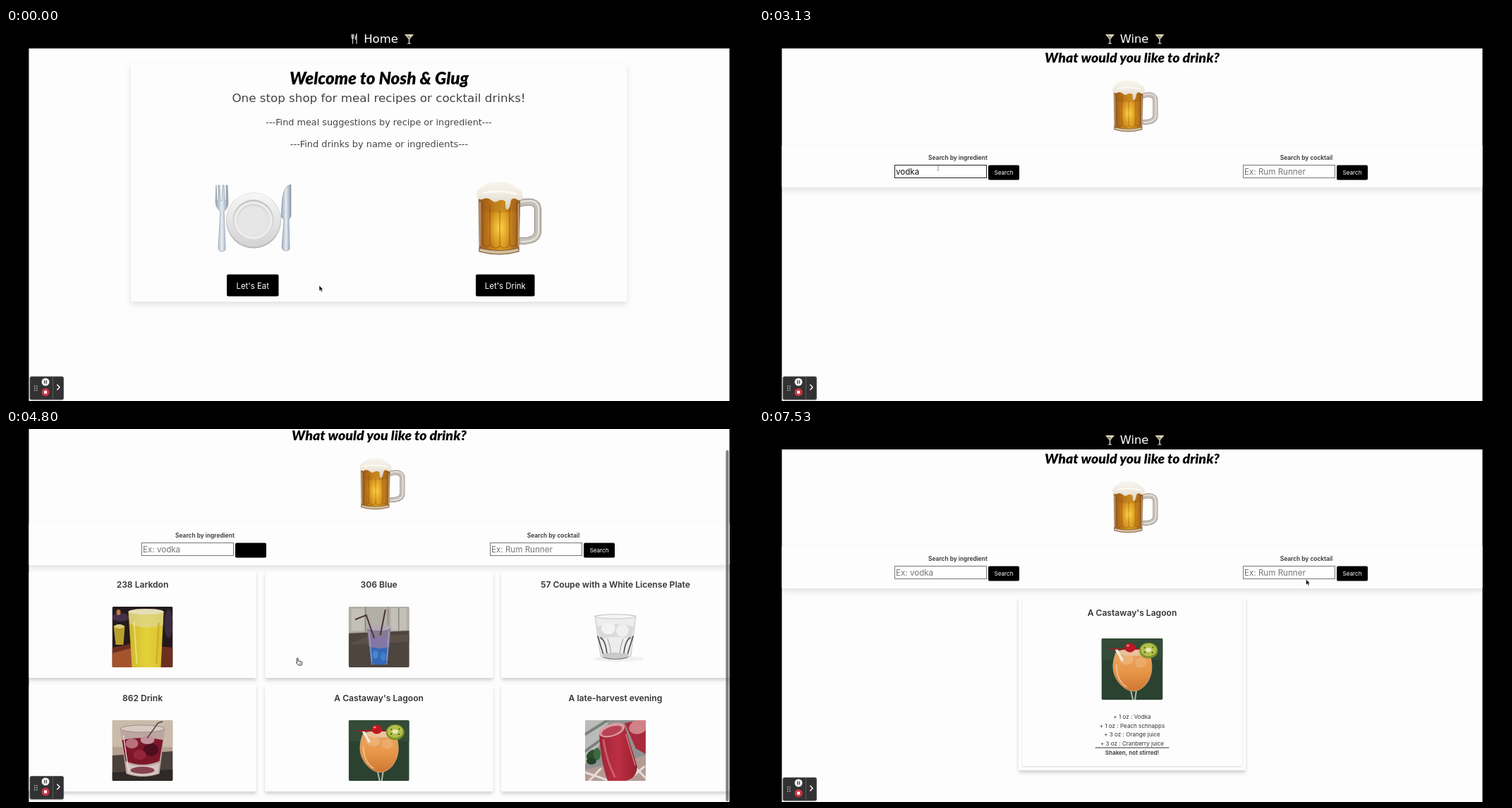
Write an HTML page that moves like this. It is 1059 px wide and 529 px high and loops after 7600 ms.

```html
<!DOCTYPE html>
<html lang="en">
<head>
<meta charset="utf-8">
<title>Recipes and drinks</title>
<style>
html, body { margin: 0; width: 100%; height: 100%; overflow: hidden; background: #000; }
svg { display: block; width: 100%; height: 100%; }
text { font-family: Inter, "Noto Sans", sans-serif; fill: #333; }
.mid { text-anchor: middle; }
.wide { font-family: "DejaVu Sans", sans-serif; fill: #444; }
.nav { font-family: "DejaVu Sans", sans-serif; fill: #fff; }
.script { font-family: Lato, sans-serif; font-weight: 900; font-style: italic; fill: #000; }
.bold { font-weight: 600; }
.light { fill: #fff; }
.hint { fill: #757575; }
</style>
</head>
<body>
<svg id="stage" viewBox="0 0 1059 529" preserveAspectRatio="none"></svg>
<script>
const LOOP = 7600, PAPER = '#fdfdfd';
const stage = document.getElementById('stage');

const rect = (x, y, w, h, fill, extra = '') =>
  `<rect x="${x}" y="${y}" width="${w}" height="${h}" fill="${fill}" ${extra}/>`;
const path = (d, fill = 'none', extra = '') => `<path d="${d}" fill="${fill}" ${extra}/>`;
const line = (d, color, width = 1, extra = '') =>
  path(d, 'none', `stroke="${color}" stroke-width="${width}" stroke-linecap="round" ${extra}`);
const oval = (x, y, rx, ry, fill, extra = '') =>
  `<ellipse cx="${x}" cy="${y}" rx="${rx}" ry="${ry}" fill="${fill}" ${extra}/>`;
const text = (x, y, size, str, cls = 'mid', id = '') =>
  `<text x="${x}" y="${y + size * .36}" font-size="${size}" class="${cls}" ${id && `id="${id}"`}>${str}</text>`;
const group = (id, body, extra = '') => `<g id="${id}" ${extra}>${body}</g>`;
const use = (id, x, y, scale = 1) => `<use href="#${id}" transform="translate(${x} ${y}) scale(${scale})"/>`;
const panel = (x, y, w, h, filter = 'shade') => rect(x, y, w, h, PAPER, `rx="2" filter="url(#${filter})"`);
const gradient = (id, stops, vertical) =>
  `<linearGradient id="${id}" ${vertical ? 'x2="0" y2="1"' : ''}>${stops.map((c, i) =>
    `<stop offset="${i / (stops.length - 1)}" stop-color="${c}"/>`).join('')}</linearGradient>`;
const shadow = (id, dy, blur, alpha) =>
  `<filter id="${id}" x="-10%" y="-20%" width="120%" height="150%"><feDropShadow dx="0" dy="${dy}" stdDeviation="${blur}" flood-opacity="${alpha}"/></filter>`;

const mug =
  line('M60 32Q86 25 87 40V72Q86 86 60 85', '#857f78', 10) +
  line('M60 32Q86 25 87 40V72Q86 86 60 85', '#c6c0b8', 8.4) +
  line('M62 30Q87 23 88 40V72Q87 86 64 86', '#e8e4de', 2) +
  path('M3 19H62L60 100Q32 108 4 100Z', 'url(#beer)', 'stroke="#8d7358" stroke-width=".7"') +
  path('M4 20H61V42Q32 48 4 42Z', '#8a4d12', 'opacity=".25"') +
  oval(33, 67, 18, 29, 'url(#glow)') +
  path('M4 95Q32 102 60 95V100Q32 108 4 100Z', '#d5bd9a', 'stroke="#5c432c" stroke-width=".8"') +
  line('M9 30V90Q15 97 19 90V34M19 90Q26 99 33 92V42M33 92Q40 99 47 90V38M47 90Q53 96 57 89V30', '#7d430d', 1.2, 'opacity=".55"') +
  line('M5 30V92M59.5 32V92', '#e2c79a', 1.4, 'opacity=".7"') +
  path('M0 20Q1 11 9 8Q16 0 30 1Q47 0 54 8Q66 12 66 24Q62 30 57 26Q52 23 49 27Q48 33 46 39Q42 43 41 36V29Q36 25 31 28Q26 32 21 27Q15 23 11 25Q5 28 2 24Z', 'url(#foam)') +
  line('M11 17Q30 12 56 18', '#fffdf8', 3, 'opacity=".8"');

const martini =
  path('M0 1H13L7.2 8V13L10 14.5H3L5.8 13V8Z', '#d9d5c8') +
  path('M2.8 3H10.2L6.5 7Z', '#8c8a55') + oval(8, 3.4, 1.3, 1.1, '#e9d9a0');

const cutlery =
  line('M2 1V5Q2 7 3.5 7T5 5V1M3.5 1V14', '#d8d8d8', 1.1) + line('M9 14V1Q7 4 7.5 8H9', '#d8d8d8', 1.2);

const plate =
  `<g stroke="#8c98a5" stroke-width=".7">` +
  path('M298 223L297 247Q298 256 304 260L301 311Q301 317 306 317Q312 317 311 311L309 260Q315 256 315 247L314 223H312L312 245H310L309 223H307L306 245H304L303 223H301L301 245H299Z', 'url(#steel)') +
  path('M404 222Q392 224 391 252L390 268L394 272L391 311Q392 316 397 316Q403 316 402 311L401 272L404 267Z', 'url(#steel)') + '</g>' +
  oval(351, 273, 39, 39.5, '#b9b9ba') + oval(351, 272, 38.3, 38.3, 'url(#china)') +
  oval(350.5, 272, 28.5, 28.5, '#c4c4c5') + oval(350.5, 273, 27.5, 27, '#ececed') +
  oval(350.5, 272.5, 23, 23, '#d6d6d7') + oval(350.5, 273.5, 22, 21.5, '#e6e6e7');

// Drink pictures, each 86 by 86
const photos = [
  rect(0, 0, 86, 86, '#241a1d') + oval(12, 15, 12, 6, '#44304a') + oval(80, 24, 6, 20, '#3b2c40') +
    oval(9, 8, 3, 4, '#bd7940') + path('M0 58L30 52L86 58V86H0Z', '#6d2f1e') + path('M0 66L30 58V86H0Z', '#a4542b') +
    path('M2 27H18L16 54H5Z', '#b89f2c') + oval(10, 28, 7, 3, '#dccb7a') +
    path('M23 7Q47 1 73 7L69 86H28Z', 'url(#lemon)') + path('M23 7Q47 1 73 7L72 26Q46 34 25 24Z', '#ded79a', 'opacity=".65"') +
    oval(48, 7, 25, 4, '#e4dfb8') + line('M31 22L35 80', '#f2ea94', 2, 'opacity=".7"') + line('M66 24L63 80', '#c39d1c', 3, 'opacity=".5"'),
  rect(0, 0, 86, 86, '#a29d96') + rect(0, 0, 86, 36, '#b3afa7') + rect(4, 3, 18, 31, '#c3c0b8') + rect(60, 2, 22, 31, '#c3c0b8') +
    line('M24 0V36M56 0V36M71 2V33', '#8b8780', 1.5) + path('M0 38L86 34V86H0Z', '#4d453e') + path('M0 54L30 40H86V50Z', '#5a5048') +
    path('M26 29H60L55 82H32Z', '#857b92') + path('M29 53H57L55 80Q44 85 32 80Z', '#3468b4') + path('M28 44H58L57 57Q42 62 29 56Z', '#8477a6') +
    oval(43, 30, 17, 4, '#b0a8b4') + oval(38, 68, 4, 6, '#5c97da', 'opacity=".6"') + oval(49, 71, 4, 6, '#4b86d2', 'opacity=".7"') +
    line('M36 44L25 12L10 18M45 40L52 5', '#4c3336', 2) + line('M29 35L33 78M57 35L54 78', '#b3afc8', 1),
  rect(0, 0, 86, 86, PAPER) + oval(48, 74, 36, 4, '#f0f0f0') +
    path('M14 13Q43 9 72 13L65 70Q43 78 22 70Z', '#ededed', 'stroke="#b0b0b0" stroke-width=".7"') +
    oval(43, 14, 28, 3, '#f6f6f6', 'stroke="#b5b5b5" stroke-width=".7"') +
    path('M17 28Q43 22 69 28L66 46Q43 40 20 46Z', '#dadada') + oval(33, 31, 10, 8, '#f3f3f3') + oval(53, 34, 9, 9, '#f0f0f0') +
    line('M18 42L26 68M68 42L60 68M22 44Q29 48 31 66M64 44Q57 48 55 66', '#4c4c4c', 1.6) +
    line('M32 46Q36 56 37 68M54 46Q50 56 49 68', '#a5a5a5', 1.2) +
    path('M24 67Q43 63 62 67V72Q43 78 25 72Z', '#cacaca') + line('M26 72Q43 77 60 72', '#777', 1.2),
  rect(0, 0, 86, 86, '#b5a190') + rect(0, 0, 86, 38, '#c9baaa') + path('M0 50L86 44V86H0Z', '#4a403c') + path('M0 74L86 70V86H0Z', '#2f2928') +
    path('M11 12H75L67 76Q43 84 20 76Z', '#bda6a0') + path('M14 28Q43 22 72 28L67 58Q43 68 19 58Z', '#7c1729') +
    oval(28, 33, 9, 7, '#b8717c') + oval(55, 42, 11, 9, '#4f0e1e') + oval(39, 49, 9, 7, '#96253a') + oval(50, 28, 10, 6, '#c4929a') +
    oval(43, 12, 31, 5, '#d8cac1', 'stroke="#90827c" stroke-width=".8"') + path('M20 61Q43 69 67 61L65 75Q43 83 22 75Z', '#d3c4c0') +
    oval(43, 71, 17, 5, '#84434d') + line('M50 25L65 4L71 2', '#504747', 1.5) + line('M16 22L23 70', '#eee2dd', 1.3),
  rect(0, 0, 86, 86, '#2b4230') + rect(0, 0, 86, 30, '#334b37') + line('M41 72L44 86M49 72L47 86', '#aeb7a8', 2) +
    path('M21 18Q43 13 66 18Q77 46 62 65Q45 83 27 65Q9 46 21 18Z', 'url(#peach)', 'stroke="#d0b48a" stroke-width=".7"') +
    oval(44, 20, 22, 4.5, '#e9c29b') + oval(35, 30, 10, 7, '#f0bd86', 'opacity=".6"') + oval(55, 34, 8, 7, '#f0bd86', 'opacity=".45"') +
    line('M21 16L29 30', '#f5e9d5', 3.5) + line('M12 15H65', '#a71b25', 1.8) + oval(40, 13, 7.5, 6.5, '#bd1823') + oval(37, 10, 2, 1.6, '#e88486') +
    oval(66, 17, 13, 11, '#7d9228') + oval(66, 16, 11, 9, '#b1c04a') + oval(66, 16, 4, 3, '#e8e8b8') +
    line('M60 13L61 13M60 20L61 19M71 20L72 20M72 13L72 12', '#343b18', 1.3) + line('M21 37Q21 59 35 68', '#f5c594', 1.5),
  rect(0, 0, 86, 86, '#8f9190') + path('M0 0H34L14 50L0 62Z', '#b9bbb8') + line('M0 20L32 0M0 44L22 28', '#7b807e', 4) +
    path('M0 70L38 62L86 50V86H0Z', '#b39b94') + line('M6 86L22 69M0 74L35 86M62 84L84 66M66 62L86 82', '#e4dcd6', 3) +
    path('M56 4L80 0H86V48L72 40Z', '#a92a3b') + oval(76, 9, 14, 10, '#cf8289', 'transform="rotate(-20 76 9)"') +
    path('M20 18Q34 2 56 7L74 66Q72 86 54 86H32Q22 58 20 18Z', 'url(#berry)') +
    oval(38, 14, 19, 9, '#d79da2', 'transform="rotate(-18 38 14)"') + oval(38, 15, 15, 6, '#b84453', 'transform="rotate(-18 38 15)"') +
    line('M26 28Q30 56 42 80', '#d9707b', 3, 'opacity=".7"') + line('M58 20L71 64', '#e0a6ab', 1.5, 'opacity=".7"') +
    oval(10, 49, 9, 6, '#2d4f2d', 'transform="rotate(-35 10 49)"') + oval(17, 48, 5, 9, '#3c6a3c') + oval(9, 58, 7, 5, '#24422a')
];

const drinks = ['238 Larkdon', '306 Blue', '57 Coupe with a White License Plate',
  '862 Drink', 'A Castaway\'s Lagoon', 'A late-harvest evening'];

const results = loaded => drinks.map((name, i) => {
  const x = 32 + i % 3 * 335.2, y = 235 + (i > 2) * (loaded ? 161 : 75);
  return panel(x, y, 323, loaded ? 151 : 66) + text(x + 161.5, y + 19, 12.1, name, 'mid bold') +
    (loaded ? use('photo' + i, x + 118.5, y + 50) : '');
}).join('');

const search = (x, label, hint, id) =>
  text(x + 90, 184, 8.4, label, 'mid bold') +
  rect(x + .5, 194.5, 130, 18, '#fff', `id="${id}Box" stroke="#767676"`) +
  text(x + 2, 204, 11.6, hint, 'hint', id + 'Text') +
  rect(x + 133, 194.5, 44, 21, '#000', `rx="2" id="${id}Button"`) +
  text(x + 155, 205, 8.2, 'Search', 'mid light', id + 'Label');

const bigButton = (x, w, label, id) => rect(x, 349.5, w, 31, '#000', `rx="2" id="${id}"`) +
  text(x + w / 2, 365.5, 11.4, label, 'mid light', id + 'Label');

const home = use('cutlery', 488, 8) + text(531.5, 15.5, 16.5, 'Home', 'mid nav') + use('martini', 565, 8) +
  panel(177, 50, 703, 338, 'soft') +
  text(529, 71, 24.2, 'Welcome to Nosh &amp; Glug', 'mid script') +
  text(528.5, 99, 16.7, 'One stop shop for meal recipes or cocktail drinks!', 'mid wide') +
  text(528.5, 133, 12.8, '---Find meal suggestions by recipe or ingredient---', 'mid wide') +
  text(529, 164.5, 12.9, '---Find drinks by name or ingredients---', 'mid wide') +
  plate + use('mug', 667, 217) + bigButton(313, 73.5, 'Let\'s Eat', 'eat') + bigButton(666, 83.5, 'Let\'s Drink', 'drink');

const recipe = ['+ 1 oz : Vodka', '+ 1 oz : Peach schnapps', '+ 3 oz : Orange juice', '+ 3 oz : Cranberry juice'];
const detail = panel(368, 238, 322, 246) + panel(373, 243, 312, 235, 'thin') +
  text(529, 260.5, 12.1, drinks[4], 'mid bold') + use('photo4', 485.5, 297, 87 / 86) +
  recipe.map((r, i) => text(529, 408 + i * 12.6, 8.1, r)).join('') +
  line('M477 452H581', '#333') + text(529, 459, 8.1, 'Shaken, not stirred!', 'mid bold');

const wine = use('martini', 491, 8) + text(532, 15.5, 16.3, 'Wine', 'mid nav') + use('martini', 561.5, 8) +
  text(529, 41.5, 19.5, 'What would you like to drink?', 'mid script') + use('mug', 501, 74, .7) +
  panel(32, 166, 994, 60, 'soft') + search(192, 'Search by ingredient', 'Ex: vodka', 'ing') +
  search(686, 'Search by cocktail', 'Ex: Rum Runner', 'cock') +
  group('names', results(false)) + group('pictures', results(true)) + group('detail', detail);

const dots = [0, 1, 2, 3, 4, 5].map(i => rect(40 + i % 2 * 3, 507 + (i >> 1) * 3, 1.5, 1.5, '#bbb')).join('');
const toolbar = rect(34, 494.5, 47.5, 32.5, '#333', 'rx="2" stroke="#555" stroke-width=".8" filter="url(#thin)"') + dots +
  oval(56, 502, 5.5, 5.5, '#f2f2f2') + line('M54.7 500V504M57.3 500V504', '#333', 1.2) +
  oval(56, 516.5, 5.5, 5.5, '#cf3442') + rect(54, 514.5, 4, 4, '#fff') +
  line('M66.5 495V526', '#666', .8) + line('M72.7 506L76 509.5L72.7 513', '#fff', 1.4);

const pointers = {
  arrow: path('M-2 -5V3L0 1.4L1.2 4.3L2.6 3.7L1.4 1H3.6Z', '#111', 'stroke="#fff" stroke-width=".5"'),
  hand: path('M-2.5 -5Q-1.4 -5.3 -1.2 -4V-1L3.8 0Q4.6 .5 4.2 2L3.4 5H-1L-4 1.5Q-4.6 0 -2.6 1L-3.2 -4Q-3.2 -5 -2.5 -5Z', '#fff', 'stroke="#222" stroke-width=".9"') +
    line('M.5 1.5V3.5M2 1.5V3.5', '#555', .6),
  beam: line('M-1 -3L0 -2.4L1 -3M0 -2.4V2.4M-1 3L0 2.4L1 3', '#777', .7)
};

stage.innerHTML = '<defs>' +
  gradient('beer', ['#8a6238', '#b96f17', '#d18f1d', '#dc9f24', '#c07a1a', '#8c602f']) +
  gradient('foam', ['#f8f5ee', '#efe9df', '#d9cfc0'], true) +
  gradient('steel', ['#8fa1b5', '#e6edf3', '#8798aa']) + gradient('china', ['#f7f7f7', '#d3d3d5'], true) +
  gradient('lemon', ['#cdb52a', '#e4d23a', '#d9c032']) + gradient('peach', ['#e6a564', '#e8984a', '#cf7633'], true) +
  gradient('berry', ['#9c2539', '#bd2f42', '#98202f']) +
  '<radialGradient id="glow"><stop stop-color="#ffd84a"/><stop offset="1" stop-color="#f0b02a" stop-opacity="0"/></radialGradient>' +
  shadow('shade', 3.5, 2.8, .17) + shadow('soft', 4, 4, .11) + shadow('thin', 1, 1.2, .16) +
  `<clipPath id="page">${rect(32.4, 0, 993.2, 529, '#fff')}</clipPath><clipPath id="frame">${rect(0, 0, 86, 86, '#fff', 'rx="2"')}</clipPath>` +
  group('mug', mug) + group('martini', martini) + group('cutlery', cutlery) +
  photos.map((p, i) => group('photo' + i, p, 'clip-path="url(#frame)"')).join('') + '</defs>' +
  rect(0, 0, 1059, 529, '#000') +
  `<g clip-path="url(#page)">${group('scroller', rect(32, 29, 994, 560, PAPER) + group('home', home) + group('wine', wine))}` +
  rect(1020.5, 30, 4, 498, '#333', 'rx="2" id="bar"') + '</g>' + group('toolbar', toolbar) +
  '<circle id="ring" fill="none" stroke="#df6f94" stroke-width="1.3"/>' +
  group('pointer', Object.keys(pointers).map(k => group(k, pointers[k])).join(''));

const $ = {};
stage.querySelectorAll('[id]').forEach(el => $[el.id] = el);
const show = (id, on) => $[id].style.display = on ? '' : 'none';
const clamp = v => Math.max(0, Math.min(1, v));
const ease = (t, a, b) => { const k = clamp((t - a) / (b - a)); return k * k * (3 - 2 * k); };
const within = (t, a, b) => t >= a && t < b;

// Pointer stops: time, x, y
const stops = [[0, 446, 370], [60, 446, 370], [800, 707, 368], [1160, 707, 368], [1600, 613, 330], [2220, 254, 199],
  [3200, 254, 199], [3520, 335, 203], [4000, 335, 203], [4600, 415.5, 330], [5380, 415.5, 330], [5460, 417, 332],
  [5530, 417, 332], [5920, 505, 437], [6260, 505, 437], [6660, 606, 400], [7070, 606, 400], [7520, 777.5, 218], [LOOP, 777.5, 218]];
const clicks = [960, 2290, 3540, 5960];

function pointerAt(t) {
  const i = stops.findIndex(s => s[0] > t), a = stops[i - 1], b = stops[i], k = ease(t, a[0], b[0]);
  return [a[1] + (b[1] - a[1]) * k, a[2] + (b[2] - a[2]) * k];
}

function paintButton(id, bg, fg) {
  $[id].setAttribute('fill', bg);
  $[id.replace('Button', '') + 'Label'].style.fill = fg;
}

function render(t) {
  const onWine = t >= 1130, cleared = t >= 6000;
  show('home', !onWine);
  show('wine', onWine);
  show('names', within(t, 3860, 4040));
  show('pictures', within(t, 4040, 6000));
  show('detail', t >= 6180);

  const scroll = cleared ? 0 : 33 * ease(t, 4670, 4790) - 2 * ease(t, 4820, 4960);
  $.scroller.setAttribute('transform', `translate(0 ${-scroll})`);
  $.toolbar.setAttribute('transform', `translate(0 ${scroll > 1 ? -2 : 0})`);
  $.bar.setAttribute('opacity', within(t, 4670, 6000) ? .62 * (1 - clamp((t - 5370) / 150)) : 0);

  const focused = within(t, 2320, 3540), typed = t < 3860 ? 'vodka'.slice(0, Math.max(0, Math.floor((t - 2340) / 140))) : '';
  $.ingBox.setAttribute('stroke', focused ? '#222' : '#767676');
  $.ingText.textContent = typed || 'Ex: vodka';
  $.ingText.style.fill = typed ? '#111' : '#757575';

  const [x, y] = pointerAt(t);
  const hover = within(t, 3260, 4400) && x > 325 && x < 369 && y < 216;
  const pressed = within(t, 3540, 6000);
  paintButton('ingButton', hover ? '#f8dc81' : '#000', hover ? '#333' : pressed ? '#000' : '#fff');
  const homeHover = !onWine && x > 666;
  paintButton('drink', homeHover ? '#f8dc81' : '#000', homeHover ? '#333' : '#fff');

  const kind = within(t, 2190, 3240) ? 'beam' : homeHover || hover || within(t, 4000, 6200) ? 'hand' : 'arrow';
  Object.keys(pointers).forEach(k => show(k, k === kind));
  $.pointer.setAttribute('transform', `translate(${x} ${y})`);

  const click = clicks.find(c => within(t, c, c + 200));
  show('ring', click);
  if (click) {
    const age = t - click;
    $.ring.setAttribute('cx', x);
    $.ring.setAttribute('cy', y - 2.5);
    $.ring.setAttribute('r', 7 + 7.5 * clamp(age / 100));
    $.ring.setAttribute('opacity', 1 - clamp((age - 100) / 100));
  }
}

const start = performance.now();
function tick() {
  render((performance.now() - start) % LOOP);
  requestAnimationFrame(tick);
}
tick();
</script>
</body>
</html>
```
